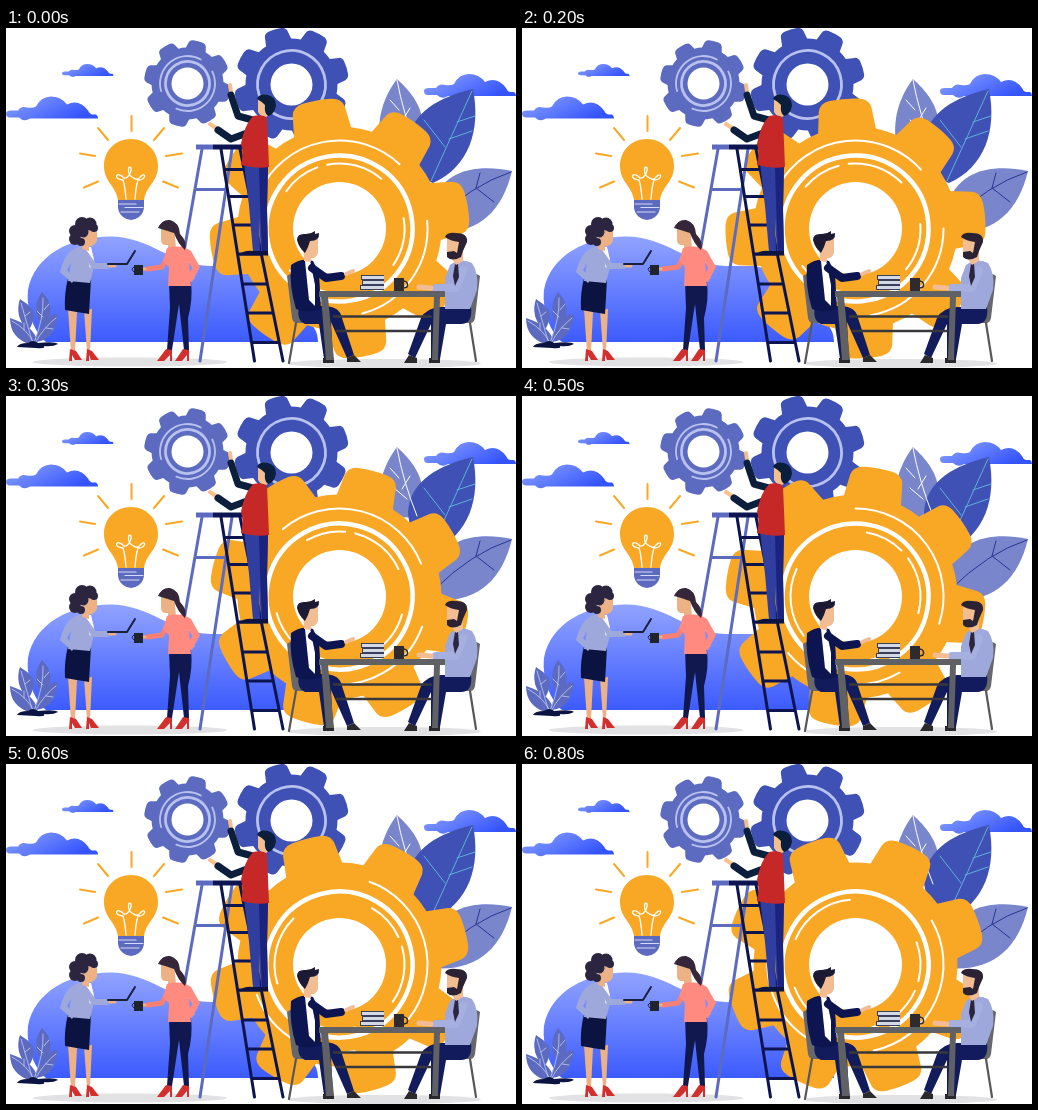
An HTML page that plays this animation: 510x340 px, repeating every 0.9 s.

```html
<!DOCTYPE html>
<html lang="en">
<head>
<meta charset="utf-8">
<title>Teamwork gears</title>
<style>
html,body{margin:0;width:100%;height:100%;overflow:hidden;background:#fff}
svg{display:block;width:100vw;height:100vh}
.l{fill:none;stroke-linecap:round;stroke-linejoin:round}
</style>
</head>
<body>
<svg viewBox="0 0 510 340">
<defs>
  <linearGradient id="hill" x1="0" y1="0" x2="0" y2="1"><stop offset="0" stop-color="#91a3ff"/><stop offset="1" stop-color="#3c5bfe"/></linearGradient>
  <linearGradient id="sky" x1="0" y1="0" x2="1" y2=".5"><stop offset="0" stop-color="#8ea6ff"/><stop offset="1" stop-color="#3453fb"/></linearGradient>
  <path id="cloud" d="M0 17Q0 14 5 14H12Q15 9 21 11Q27 12 30 10Q35 0 45 0Q55 0 61 8Q73 2 82 14Q83 17 86 18H90Q92 19 92 22H24Q18 26 13 21H4Q0 21 0 17Z"/>
</defs>
<g fill="url(#sky)">
  <use href="#cloud" transform="translate(0 68.5)"/>
  <use href="#cloud" transform="translate(56 36) scale(.56 .54)"/>
  <use href="#cloud" transform="translate(418 46)"/>
</g>
<path fill="url(#hill)" d="M22 262C28 228 64 208.500 104 208.500C145 208.500 164 237 204 238H232C256 240 264 266 278 278C296 290 312 294 312 314H40C28 304 20 282 22 262Z"/>
<ellipse cx="124" cy="334" rx="97" ry="4.500" fill="#e2e2e4"/>
<ellipse cx="378" cy="335.500" rx="97" ry="4.500" fill="#e2e2e4"/>

<g id="leaves">
  <path fill="#7986cb" d="M391 51C378 68 369 92 375 120L412 122C421 98 419 76 391 51Z"/>
  <path fill="#3f51b5" d="M467 61C434 69 404 84 402 116C403 139 416 151 427 155C463 139 475 102 467 61Z"/>
  <path fill="#7986cb" d="M506 143C472 136 436 141 425 178L426 204C470 208 496 185 506 143Z"/>
  <g class="l" stroke-width="1">
    <path stroke="#fff" d="M391 52Q397 85 411 120M393 82L384 72M396 93L404 80M401 103L388 92"/>
    <path stroke="#5fb0d8" d="M466 63Q446 107 425 153M451 94L469 88M443 111L466 103M439 119L418 92"/>
    <path stroke="#283593" d="M505 144Q465 157 428 194M470 160L488 174M470 160L474 145"/>
  </g>
</g>

<g id="plant">
  <path fill="#5c6bc0" d="M36 264Q27 276 32 292Q39 298 44 288Q47 275 36 264ZM14 271Q8 288 22 303Q30 292 27 282Q21 275 14 271ZM4 290Q4 311 26 317L32 314Q27 297 4 290ZM52 286Q33 287 29 314Q49 313 52 286Z"/>
  <path class="l" stroke="#c5cdf2" stroke-width=".8" d="M37 270Q38 290 28 315M15 275Q22 299 27 316M6 293Q21 301 28 315M50 290Q38 299 29 315M38 282L43 276M37 289L31 283M19 288L24 284M18 302L18 295M40 300L47 301"/>
  <path fill="#0b1340" d="M11 319Q13 315 22 315Q27 311 32 315Q49 313 52 316Q47 319 38 318Q40 321 30 320Z"/>
</g>

<g id="wheels"></g>

<g id="bulb">
  <path class="l" stroke="#f9a826" stroke-width="2" d="M125.500 88V103M92 100L102 112M158 100L148 112M74 125.500L89 128M176 125.500L160 128M78 159.500L92 153.500M172 159.500L157 153.500"/>
  <path fill="#f9a826" d="M125 111C109 111 98 123 98 138C98 154 110 158 112 172H138C140 158 152 154 152 138C152 123 140 111 125 111Z"/>
  <path class="l" stroke="#fff" stroke-width="1.300" d="M120 171Q119 158 117 152C106 151 111 142 118 150C122 151 126 144 125 140C122 136 121 146 126 149C130 152 132 152 134 149C140 143 141 152 132 152Q130 158 129 171"/>
  <path fill="#5c6bc0" d="M112 172H138V180Q137 186 133 189Q125 195 117 189Q113 186 112 180Z"/>
  <path class="l" stroke="#d5daf5" stroke-width="1.200" d="M113 176H130M119 179.500H137M115 184H133"/>
</g>

<g id="ladder" class="l">
  <path stroke="#5c6bc0" stroke-width="3" d="M196 121L176 235M226 121L194 333M190 161.500H220"/>
  <path stroke="#0d1550" stroke-width="3" d="M215 121L248.500 333M234 121L277 333M220 141.500H237M223 168.500H242M228 197H247M232 226H253M237 256H261M242 285H267M247 314.500H273"/>
  <path stroke="#5c6bc0" stroke-width="5" stroke-linecap="butt" d="M190 119H207"/>
  <path stroke="#0d1550" stroke-width="5" stroke-linecap="butt" d="M207 119H238"/>
</g>

<g id="climber">
  <path fill="#303f9f" d="M238 135H262L261 180L262 224H255L253 190L254 224H247L243 178Z"/>
  <path fill="#1a237e" d="M253 139H262L261 182L262 224H256L254 175Z"/>
  <path fill="#0b1340" d="M233 227Q238 222 247 223H262V227.500H234Z"/>
  <path class="l" stroke="#f5c08c" stroke-width="4" d="M224 57L225 63M204 96L210 100"/>
  <path class="l" stroke="#0b1f3c" stroke-width="7" d="M254 94L232 88L225 67"/>
  <path class="l" stroke="#0b1f3c" stroke-width="7" d="M241 105L225 111L212 102"/>
  <path fill="#f5c08c" d="M252 70L262 70V88Q256 91 252 84Z"/>
  <path fill="#c62828" d="M247 88Q257 86 261 90L263 139Q250 141 235 137Q238 124 235 116Q238 98 247 88Z"/>
  <path fill="#0b1f3c" d="M251 71Q253 65 262 67Q270 69 270 78Q268 87 262 88Q258 85 259 77Q255 73 251 71Z"/>
</g>

<g id="curly">
  <path fill="#ecb184" d="M62 281L71 284L69 324H65ZM78 282L86 281L84 324H81Z"/>
  <path fill="#d32f2f" d="M64 321L70 323L76 332H69L66 327V333H63ZM81 321L86 323L93 332H85L83 327V333H80Z"/>
  <path fill="#0b1340" d="M62 250L85 251L83 286L59 282Q58 266 62 250Z"/>
  <path fill="#9fa8da" d="M69 220Q78 216 85 219L89 235L84 255L62 253L65 235L61 242L69 251L66 255L54 244Q58 226 69 220Z"/>
  <path fill="#fff" d="M78 219L85 219L88 232L84 240Z"/>
  <path class="l" stroke="#9fa8da" stroke-width="6" d="M78 224L88 238L101 238"/>
  <path class="l" stroke="#ecb184" stroke-width="3" d="M104 238H109"/>
  <path fill="#ecb184" d="M78 202H91V213Q88 219 83 218V223L76 221Z"/>
  <g fill="#2b2540"><circle cx="76" cy="196" r="7"/><circle cx="84" cy="196" r="6.500"/><circle cx="69" cy="203" r="6"/><circle cx="69" cy="211" r="6"/><circle cx="77" cy="204" r="5.500"/><circle cx="88" cy="200" r="4"/><circle cx="75" cy="214" r="4"/></g>
  <path class="l" stroke="#1b1f3d" stroke-width="2" d="M102 236H121L129 223"/>
</g>

<g id="longhair">
  <path fill="#10184f" d="M163 254H185Q187 272 182 290L183 322H178L173 276L166 322H161L164 280Z"/>
  <path fill="#d32f2f" d="M160 321L166 322V333H164V327L158 333H151ZM177 321L183 322V333H181V327L176 333H169Z"/>
  <path fill="#ecb184" d="M155 200L168 198L170 220L162 222V217Q155 218 155 212Z"/>
  <path class="l" stroke="#f78074" stroke-width="5" d="M164 225L156 239L141 241"/>
  <path class="l" stroke="#ecb184" stroke-width="3" d="M134 241H139M183 252L187 250"/>
  <path fill="#ff8a80" d="M161 220Q175 216 185 223L194 239L186 254L181 250L186 240L183 234L185 258H162L163 239L157 233Z"/>
  <path fill="#35263a" d="M152 200Q156 191 164 192Q173 194 174 206Q182 214 179 222Q172 216 168 205Q162 203 152 200Z"/>
  <path fill="#202431" d="M128 237H137V247H128Z"/><path class="l" stroke="#202431" d="M128 239Q124 241 128 244"/>
</g>

<g id="chairs">
  <path fill="#68686c" d="M281 248Q286 243 290 252L294 288H314V295H291Q287 295 286 290ZM474 248Q469 243 465 252L461 288H440V295H464Q468 295 469 290Z"/>
  <path class="l" stroke="#58585c" stroke-width="2.200" d="M290 295L283 335M464 295L470 333"/>
</g>

<g id="seated-left">
  <path fill="#121c5c" d="M293 278H320Q334 279 336 290L348 327L341 330L325 294L327 331H318L313 296H299Q290 292 293 278Z"/>
  <path fill="#2a2a2e" d="M317 330H328V335H317ZM341 330L348 327L355 334H341Z"/>
  <path fill="#0d1550" d="M285 237Q296 229 307 233L313 245L315 281Q302 286 290 281Q283 258 285 237Z"/>
  <path fill="#fff" d="M299 233L304 232L309 257V278L303 272Z"/>
  <path class="l" stroke="#0d1550" stroke-width="8" d="M306 240L320 250L335 248"/>
  <path class="l" stroke="#f2bd92" stroke-width="4" d="M340 246L347 243"/>
  <path fill="#f2bd92" d="M297 211H312V225Q310 231 305 230V234L298 233Z"/>
  <path fill="#1d1a33" d="M291 212Q291 205 300 206Q305 206 309 203V206L313 205Q314 213 304 213L302 219L299 225Q293 220 291 212Z"/>
</g>

<g id="seated-right">
  <path fill="#121c5c" d="M435 279H465Q467 295 456 296H440L434 331H425L425 296L409 330L402 326L415 290Q420 280 435 279Z"/>
  <path fill="#2a2a2e" d="M423 330H434V335H423ZM403 327L411 330V335H398Z"/>
  <path fill="#9fa8da" d="M444 237Q455 229 466 235Q473 245 471 262L464 281H439V250Z"/>
  <path class="l" stroke="#a5afe0" stroke-width="8" d="M457 242L450 260L430 260"/>
  <path class="l" stroke="#f2bd92" stroke-width="5" d="M413 259L425 260"/>
  <path fill="#2b2540" d="M449 236L452 236L453 249L449 258L447 248Z"/>
  <path fill="#f2bd92" d="M441 210H457V233L450 237L446 231Q440 229 441 220Z"/>
  <path fill="#2b2333" d="M439 209Q441 204 450 205Q462 205 461 214L457 223L455 229Q446 234 441 229V224L448 223L451 225L453 214Q444 213 439 209Z"/>
</g>

<g id="table">
  <path fill="#606165" d="M313 263H439V269H313ZM315 269H322L328 332H320ZM428 269H434L432 332H426Z"/>
  <path class="l" stroke="#38383c" stroke-width="2.500" d="M328 288.500H425M331 303H425"/>
  <path fill="#3a3f5c" d="M355 247H378V262H354V257H356V252H355Z"/>
  <path fill="#d5d9e6" d="M356 248H378V251H356ZM357 253H378V256H357ZM355 258H378V261H355Z"/>
  <path fill="#2f2a2e" d="M388 250H398V263H388Z"/><path class="l" stroke="#2f2a2e" stroke-width="1.500" d="M398 253Q403 254 401 259L398 260"/>
</g>
</svg>
<script>
const TAU = Math.PI * 2, STEP = 100, STEPS = 9, TURN = 20, REST = 35;
const point = (r, deg) => {
  const a = deg * TAU / 360;
  return `${(r * Math.sin(a)).toFixed(2)} ${(-r * Math.cos(a)).toFixed(2)}`;
};
const arc = (r, from, to) => `M${point(r, from)}A${r} ${r} 0 ${to - from > 180 ? 1 : 0} 1 ${point(r, to)}`;

// Eight rounded teeth on a disc
function gearPath(root, tip) {
  let d = '';
  for (let a = 0; a < 360; a += 45) {
    const p = (r, off) => point(r, a + off);
    d += `${a ? 'L' : 'M'}${p(root, -16.5)}L${p(tip * .94, -12.5)}Q${p(tip, -11)} ${p(tip, -6.5)}` +
      `Q${p(tip * 1.008, 0)} ${p(tip, 6.5)}Q${p(tip, 11)} ${p(tip * .94, 12.5)}L${p(root, 16.5)}` +
      `A${root} ${root} 0 0 1 ${p(root, 28.5)}`;
  }
  return d + 'Z';
}
const stroke = (d, w, color = '#fff') => `<path class="l" d="${d}" stroke="${color}" stroke-width="${w}"/>`;
const ring = (r, w, color = '#fff') => `<circle r="${r}" fill="none" stroke="${color}" stroke-width="${w}"/>`;
const gear = (x, y, turn, root, tip, hole, color, trim, id) =>
  `<g transform="translate(${x} ${y})"><g id="${id}" transform="rotate(${turn})">` +
  `<path d="${gearPath(root, tip)}" fill="${color}"/>${trim}</g><circle r="${hole}" fill="#fff"/></g>`;

const bigTrim = ring(73, 4.5) +
  stroke(arc(88, -100, 8), 2) + stroke(arc(88, 50, 130), 2) +
  [[-90, -55], [-46, 5], [46, 89], [133, 195]].map(([a, b]) => stroke(arc(65, a, b), 2)).join('');
const pale = '#b9c2ee';

document.getElementById('wheels').innerHTML =
  gear(181.5, 55.5, 14, 36, 43.5, 16, '#5c6bc0',
    ring(22, 2.8, pale) + stroke(arc(27.5, -120, 15) + arc(27.5, 50, 190), 1.8, pale), 'small') +
  gear(285.5, 56.5, -17, 46, 57.5, 21, '#3f51b5', ring(34, 2.8, pale), 'middle') +
  gear(333.5, 200.5, REST, 102, 130, 46.5, '#f9a826', bigTrim, 'big');

const big = document.getElementById('big');
// The wheel starts from its rest pose, then turns evenly in hard steps
function draw(now) {
  const step = Math.floor(now / STEP) % STEPS;
  big.setAttribute('transform', `rotate(${step ? TURN * step : REST})`);
}
function tick(now) {
  draw(now);
  requestAnimationFrame(tick);
}
draw(0);
requestAnimationFrame(tick);
</script>
</body>
</html>
```
